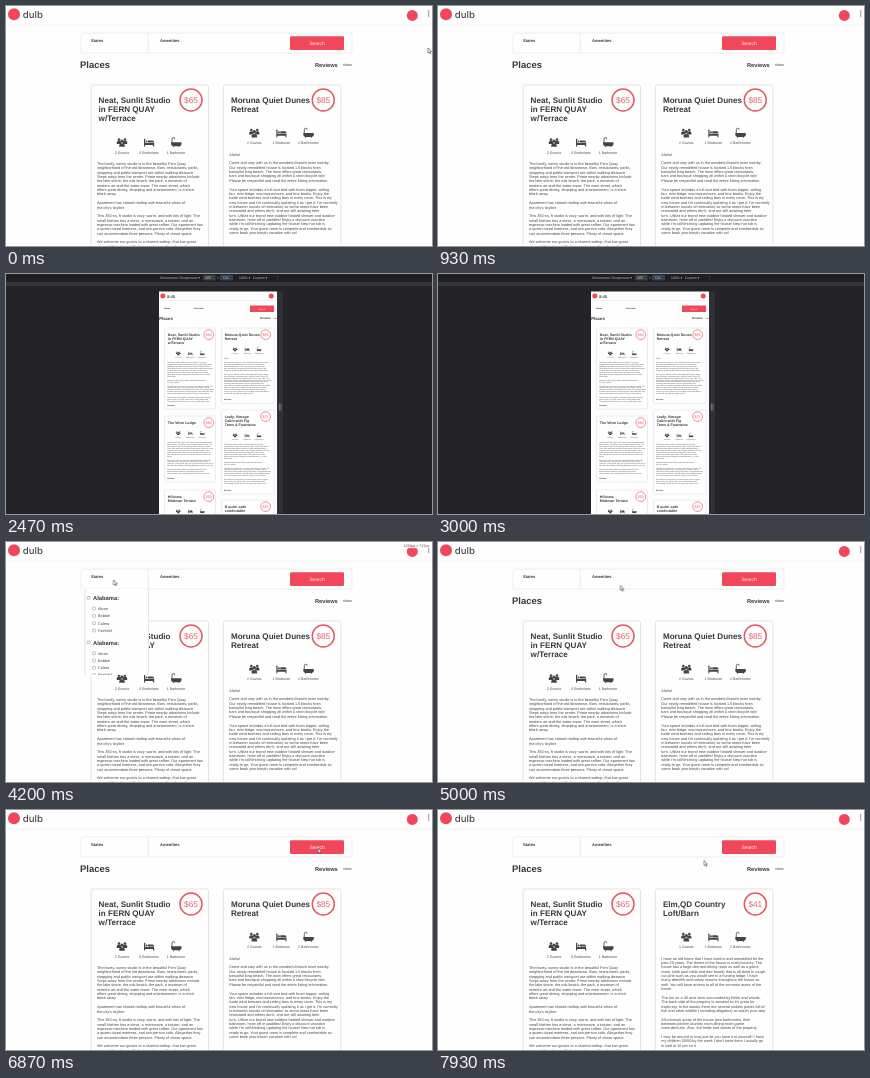
Animation of 426x240 px, one loop 8 s. Source, as an HTML page:

```html
<!DOCTYPE html>
<html lang="en">
<head>
<meta charset="utf-8">
<title>Rental listings</title>
<style>
  html, body { margin: 0; width: 100%; height: 100%; overflow: hidden; background: #fefefe; }
  svg { display: block; width: 100vw; height: 100vh; }
  text { font-family: "Liberation Sans", Arial, sans-serif; fill: #484848; text-rendering: geometricPrecision; white-space: pre; }
  .bold { font-weight: 700; fill: #383838; }
  .mid { text-anchor: middle; }
  .red { fill: #e2626c; }
  .brand { font-family: Inter, "Open Sans", sans-serif; font-weight: 500; }
  .tool { fill: #c4c4c8; }
  .line { fill: none; stroke: #dedcdc; stroke-width: .8; }
  .icon { fill: #444; }
</style>
</head>
<body>
<svg id="stage" viewBox="0 0 426 240" preserveAspectRatio="none"></svg>
<script>
const LOOP = 8000;
const RED = '#f0485a';

const text = (x, y, size, str, cls = '') =>
  `<text x="${x}" y="${y}" font-size="${size}" class="${cls}">${str.replace(/&/g, '&amp;')}</text>`;
const rect = (x, y, w, h, attrs) => `<rect x="${x}" y="${y}" width="${w}" height="${h}" ${attrs}/>`;
const circle = (x, y, r, attrs = `fill="${RED}"`) => `<circle cx="${x}" cy="${y}" r="${r}" ${attrs}/>`;
const group = (id, body) => `<g id="${id}">${body}</g>`;

const studioText = `The lovely, sunny studio is in the beautiful Fern Quay
neighborhood of the old downtown. Bars, restaurants, parks,
shopping and public transport are within walking distance
Steps away from the center. Prime nearby attractions include
the lake shore, the oak beach, the park, a museum of
modern art and the water tower. The main street, which
offers great dining, shopping and entertainment, is a short
block away

Apartment has shared rooftop with beautiful views of
the city's skyline

This 350 sq. ft studio is cozy, warm, and with lots of light. The
small kitchen has a stove, a microwave, a toaster, and an
espresso machine loaded with great coffee. Our apartment has
a queen-sized mattress, and two-person sofa. Altogether they
can accommodate three persons. Plenty of closet space.

We welcome our guests to a shared rooftop, that has great
views of the city, a grill, chairs and a small garden table.
The building is quiet and close to every train and bus line.`.split('\n');

const beachText = `Aloha!

Come and stay with us in the wonderful beach town nearby.
Our newly remodeled house is located 1.5 blocks from
beautiful long beach. The town offers great restaurants,
bars and boutique shopping all within a short bicycle ride.
Please be respectful and read the entire listing information.

Your space includes a full size bed with foam topper, ceiling
fan, mini fridge, microwave/oven, and four books. Enjoy the
trade wind breezes and ceiling fans in every room. This is my
new house and I'm continually updating it as I get it. I'm currently
in between rounds of renovation so some areas have been
renovated and others don't, and are still awaiting their
turn. Utilize our brand new outdoor heated shower and outdoor
bathroom, hose off or paddles! Enjoy a discount vacation
while I'm still finishing updating the house! New hot tub is
ready to go. Your guest room is complete and comfortable so
come book your beach vacation with us!`.split('\n');

const farmText = `I have an old home that I have lived in and remodeled for the
past 20 years. The theme of the house is rustic/country. The
house has a large den and dining room as well as a game
room, (with pool table and dart board) that is all done in rough
cut pine such as you would see in a hunting lodge. I have
many deer/elk and turkey mounts throughout the house as
well. You will have access to all of the common areas of the
home.

The Inn on a 40 acre farm surrounded by fields and woods.
The back side of the property is wooded so it's great for
exploring. In the woods there are several sinkers ponds full of
fish and other wildlife ( including alligators) so watch your step

All common areas of the house (two bathrooms, their
bedroom,kitchen,laundry room,dining room,game
room,deck,etc. Also, the fields and woods of the property

I may be around or may just let you have it to yourself! I have
my children 50/50 by the week I don't have them I usually go
to bed at 10 pm so it`.split('\n');

function icons(y) {
  const person = (x, top, s) => circle(x, top, 1.4 * s, 'class="icon"') +
    `<path class="icon" d="M${x - 2.4 * s} ${top + 5 * s}v-1.6q0-1.8 ${2.4 * s}-1.8t${2.4 * s} 1.8v1.6z"/>`;
  const guests = person(28, y - 3.4, .9) + person(34, y - 3.4, .9) + person(31, y - 1.8, 1.15);
  const bed = `<path class="icon" d="M53 ${y - 4}h1.2v4.2h9v3.6h-1.1v-1.6h-8v1.6h-1.1zM57 ${y - 2.2}h4.2q2 0 2 2h-6.2z"/>` +
    circle(55.6, y - 1.3, 1, 'class="icon"');
  const bath = `<path class="icon" d="M80 ${y - .5}h10.5v1.2q0 2.7-2.7 2.7h-5q-2.8 0-2.8-2.7z"/>
    <path d="M81 ${y}v-3.8q0-1.5 1.4-1.5t1.4 1.6M82.4 ${y + 3}v1.5M88 ${y + 3}v1.5" fill="none" stroke="#444" stroke-width=".8"/>`;
  return guests + bed + bath;
}

// Every card shares one layout; the narrow view only scales it.
function card({ x, y, k = 1, w = 117.5, h = 240, title, price, rooms, lines }) {
  const top = 39.2 + 9.3 * (title.length - 1);
  const labels = rooms.map((label, i) => text(31 + 27 * i, top + 10.8, 3.6, label, 'mid'));
  const titles = title.map((line, i) => text(7.6, 17.5 + 9.3 * i, 8.1, line, 'bold'));
  const body = lines.map((line, i) => text(6, top + 22.2 + 4.35 * i, 3.8, line));
  const reviews = k < 1 ? text(6, h - 7, 4.2, 'Reviews', 'bold') : '';
  return `<g transform="translate(${x} ${y}) scale(${k})">` +
    rect(0, 0, w, h, `class="line" rx="2" style="stroke-width:${k < 1 ? 1.2 : .8}"`) +
    titles.join('') +
    circle(100, 15, 11, 'fill="#fefefe" stroke="#e45862" stroke-width="1.5"') +
    text(100, 18, 8.3, '$' + price, 'mid red') +
    icons(top) + labels.join('') + body.join('') + reviews + '</g>';
}

const studio = { title: ['Neat, Sunlit Studio', 'in FERN QUAY', 'w/Terrace'], price: 65,
  rooms: ['2 Guests', '0 Bedrooms', '1 Bathroom'], lines: studioText };
const beach = { title: ['Moruna Quiet Dunes', 'Retreat'], price: 85,
  rooms: ['2 Guests', '1 Bedroom', '2 Bathrooms'], lines: beachText };
const farm = { ...beach, title: ['Elm,QD Country', 'Loft/Barn'], price: 41,
  rooms: ['1 Guests', '1 Bedroom', '2 Bathrooms'], lines: farmText };

const desktop = rect(0, 0, 426, 240, 'fill="#fefefe"') +
  circle(8, 8.3, 6) + text(16.8, 12, 9.6, 'dulb', 'brand') +
  '<path d="M0 19H426" class="line" style="stroke:#eee"/>' +
  circle(406.3, 9.4, 5.5) +
  rect(422, 4, 1.2, 7, 'fill="#aaa"') +
  rect(75, 27, 271, 20, 'class="line" rx="1.5" style="stroke:#e9e7e7"') +
  '<path d="M142.3 27V47" class="line" style="stroke:#e9e7e7"/>' +
  text(85, 36.2, 4.1, 'States', 'bold') + text(154, 36.2, 4.1, 'Amenities', 'bold') +
  rect(284, 30.3, 54, 13.6, `fill="${RED}" rx="1.2"`) +
  '<text x="311" y="38.8" font-size="4.8" class="mid" style="fill:#fff">Search</text>' +
  text(74, 62, 9.5, 'Places', 'bold') + text(309, 60.5, 5.7, 'Reviews', 'bold') +
  text(337, 60, 3.8, 'show') +
  card({ ...studio, x: 85, y: 79 }) +
  group('before', card({ ...beach, x: 217.3, y: 79 })) +
  group('after', card({ ...farm, x: 217.3, y: 79 }));

const box = (x, y) => rect(x, y, 2.8, 2.8, 'fill="#fff" stroke="#888" stroke-width=".5" rx=".5"');
const stateList = y => box(81.3, y - 3.7) + text(87, y, 5.8, 'Alabama:', 'bold') +
  ['Akron', 'Babbie', 'Calera', 'Fairfield'].map((city, i) =>
    box(86.6, y + 7 + 7.3 * i) + text(92, y + 9.7 + 7.3 * i, 3.8, city)).join('');
const menu = '<clipPath id="menuClip"><rect x="73" y="47.5" width="69.8" height="85"/></clipPath><g clip-path="url(#menuClip)">' +
  rect(73, 47, 70, 86, 'fill="#fefefe"') + rect(79, 46, 63.3, 90, 'class="line"') +
  stateList(58.2) + stateList(102.8) + '</g>';

const K = .443;
const small = (x, y, h, title, price, rooms, lines) =>
  card({ x, y, k: K, w: x < 200 ? 115 : 119, h: h / K, title, price, rooms, lines });
const mobile = rect(0, 0, 426, 240, 'fill="#242428"') +
  rect(0, 0, 426, 7.5, 'fill="#1e1e21"') + rect(0, 8, 426, 4.2, 'fill="#34343a"') +
  text(154, 5.1, 3.4, 'Dimensions: Responsive ▾', 'tool') +
  rect(197, .8, 12.5, 5.6, 'fill="#3c4046"') + text(199, 5.1, 3.6, '485', 'tool') +
  text(211, 5, 3.6, '×', 'tool') +
  rect(214, .8, 13, 5.6, 'fill="#34425a"') + text(216.5, 5.1, 3.6, '724', 'tool') +
  text(233, 5.1, 3.4, '100% ▾', 'tool') + text(247, 5.1, 3.4, 'Custom ▾', 'tool') + text(269.5, 5.2, 4, '⋮', 'tool') +
  rect(271, 17.5, 6, 223, 'fill="#303035"') +
  '<path d="M273.4 129.5v7M275 129.5v7" stroke="#aaa" stroke-width=".6"/>' +
  rect(153, 17.5, 118, 223, 'fill="#fefefe"') +
  circle(156.8, 22, 2.5) + text(160.5, 23.8, 4.3, 'dulb', 'brand') + circle(265.2, 22, 2.5) +
  '<path d="M153 26.5H271" class="line" style="stroke:#eee"/>' +
  text(158, 34.6, 2.1, 'States', 'bold') + text(188, 34.6, 2.1, 'Amenities', 'bold') +
  rect(244, 31.6, 24, 6.3, `fill="${RED}" rx=".5"`) +
  '<text x="256" y="35.5" font-size="2.2" class="mid" style="fill:#fff">Search</text>' +
  text(153.2, 46, 4.3, 'Places', 'bold') + text(254, 45.2, 2.7, 'Reviews', 'bold') + text(267.3, 45.2, 1.7, 'show') +
  small(158.5, 54, 81, studio.title, 65, studio.rooms, studioText) +
  small(215.3, 54, 75.5, beach.title, 85, beach.rooms, beachText) +
  small(158.5, 142, 66, ['The Wren Lodge'], 82, studio.rooms, farmText.slice(0, 17)) +
  small(215.3, 136, 84, ['Leafy, Vintage', 'Cabin with Fig', 'Trees & Fountains'], 75, beach.rooms, studioText) +
  small(158.5, 216, 60, ['Hillview,', 'Midtown Terrace'], 53, studio.rooms, []) +
  small(215.3, 226, 60, ['B quiet ,safe', 'comfortable'], 55, beach.rooms, []);

const sizeTip = rect(396, 0, 27, 6.2, 'fill="#fff" fill-opacity=".85"') + text(397.5, 4.6, 3.6, '1293px × 727px');
const pointer = '<path d="M0 0V5L1.2 4L2 5.8L2.9 5.4L2.1 3.7H3.6Z" fill="#fff" stroke="#222" stroke-width=".5"/>';

const stage = document.getElementById('stage');
stage.innerHTML = desktop + group('menu', menu) + group('tip', sizeTip) +
  group('mobile', mobile) + group('pointer', pointer);

const animations = [];
function play(id, frames) {
  animations.push(document.getElementById(id).animate(frames, { duration: LOOP, iterations: Infinity }));
}

// Hard on/off: visible only from start to end.
function showBetween(id, start, end) {
  const steps = [[0, start === 0 ? 1 : 0]];
  if (start > 0) steps.push([start, 1]);
  if (end < LOOP) steps.push([end, 0]);
  steps.push([LOOP, end < LOOP ? 0 : 1]);
  play(id, steps.map(([ms, opacity]) => ({ offset: ms / LOOP, opacity, easing: 'step-end' })));
}

showBetween('mobile', 1800, 3600);
showBetween('tip', 3600, 4700);
showBetween('menu', 3930, 4730);
showBetween('before', 0, 7270);
showBetween('after', 7270, LOOP);

const path = [
  [0, 422, 42], [400, 424, 42], [460, 440, 60], [3530, 440, 60], [3600, 250, 20],
  [3930, 112, 36], [4200, 107.5, 38], [4700, 110, 38], [5400, 300, 52],
  [5800, 324.5, 53.5], [6400, 339, 57], [6900, 312, 38], [7300, 310, 38],
  [7800, 266, 50.5], [LOOP, 266, 50.5]
];
play('pointer', path.map(([ms, x, y]) => ({
  offset: ms / LOOP, transform: `translate(${x}px, ${y}px)`, easing: 'ease-in-out'
})));

const start = document.timeline.currentTime ?? 0;
animations.forEach(a => { a.startTime = start; });
</script>
</body>
</html>
```
